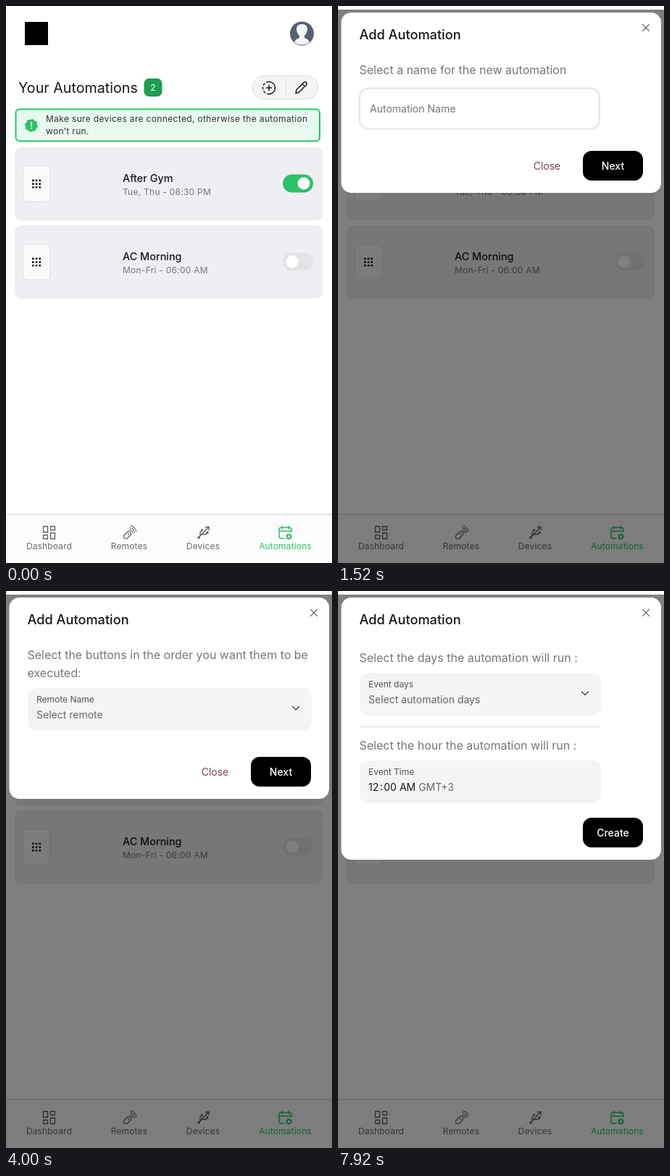
Animation of 450x769 px, one loop 8 s. Source, as an HTML page:

```html
<!DOCTYPE html>
<html lang="en">
<head>
<meta charset="utf-8">
<title>Add Automation</title>
<style>
html, body { margin: 0; height: 100%; overflow: hidden; background: #fff; }
svg { display: block; width: 450px; height: 769px; font-family: Inter, "Open Sans", sans-serif; }
</style>
</head>
<body>
<svg id="stage" viewBox="0 0 450 769"></svg>
<script>
const LOOP = 8000;
const GREEN = '#2cc168', DARK_GREEN = '#20a552', INK = '#18181b', GREY = '#76767c', FIELD = '#f4f4f5';
const stage = document.getElementById('stage');

// drawing helpers
const text = (x, y, s, size = 14, fill = INK, more = '') =>
  `<text x="${x}" y="${y}" font-size="${size}" fill="${fill}" ${more}>${s}</text>`;
const mid = (x, y, s, size, fill, more = '') => text(x, y, s, size, fill, 'text-anchor="middle" ' + more);
const rect = (x, y, w, h, r, fill, more = '') =>
  `<rect x="${x}" y="${y}" width="${w}" height="${h}" rx="${r}" fill="${fill}" ${more}/>`;
const circle = (x, y, r, fill, more = '') => `<circle cx="${x}" cy="${y}" r="${r}" fill="${fill}" ${more}/>`;
const line = (d, color, width = 1.3, more = '') =>
  `<path d="${d}" fill="none" stroke="${color}" stroke-width="${width}" stroke-linecap="round" stroke-linejoin="round" ${more}/>`;
const group = (id, body, more = '') => `<g id="${id}" ${more}>${body}</g>`;
const bold = 'font-weight="500"';
const lines = (x, y, step, rows, size, fill) => rows.map((s, i) => text(x, y + i * step, s, size, fill)).join('');

// page behind the dialog
function card(y, name, when, on) {
  let dots = '';
  for (let i = 0; i < 9; i++) dots += rect(36 + i % 3 * 4.7, y + 43.5 + Math.floor(i / 3) * 4.7, 2.7, 2.7, .7, INK);
  return rect(13, y, 423, 99, 8, '#efeff3', 'stroke="#e3e3e8"') +
    rect(23.5, y + 25, 37, 49, 6, '#fafafa', 'stroke="#e0e0e4"') + dots +
    text(161, y + 46.5, name, 14.4, INK, bold) +
    text(161, y + 64.5, when, 12, GREY, 'letter-spacing=".25"') +
    rect(382, y + 36.5, 42, 25, 12.5, on ? GREEN : '#e4e4e7') +
    circle(on ? 411 : 395, y + 49, 8.5, '#fff');
}

function nav() {
  const c = '#5c5c64', label = (x, s, fill = '#6b6b72') => mid(x, 750, s, 12, fill, 'letter-spacing=".15"');
  return rect(0, 702, 450, 67, 0, '#fcfcfc') + line('M0 702H450', '#dedee2', 1.5) +
    line('M51.5 718.5h6v8h-6zM61.5 718.5h6v5h-6zM51.5 730.5h6v5h-6zM61.5 727.5h6v8h-6z', c) +
    rect(-6, -3, 12, 6, 3, 'none', `stroke="${c}" stroke-width="1.2" transform="translate(167.5 730.5) rotate(-45)"`) +
    circle(169, 729, 1, c) +
    line('M171 723.5a4.5 4.5 0 0 1 4 4M171.5 720.5a7.5 7.5 0 0 1 6 6.5M172 717.500a10.5 10.5 0 0 1 8 8', c, 1.1) +
    line('M265.5 734.5L279 720M275.5 719.5l4.5-.5v4.5M268 731.5v-5l3-3M271 729.5h5l2.5-2.5', c) +
    circle(266, 734, 1.7, c) + circle(270.5, 723.5, 1.4, c) + rect(276.5, 725.5, 3, 3, .5, c) +
    line('M384 735h-4q-3 0-3-3v-9q0-3 3-3h11q3 0 3 3v3M377 725h17M381 718v4M390 718v4', GREEN, 1.5) +
    circle(390.5, 732.5, 2.6, 'none', `stroke="${GREEN}" stroke-width="1.8"`) +
    circle(390.5, 732.5, 4.2, 'none', `stroke="${GREEN}" stroke-dasharray="1.65"`) +
    label(59.5, 'Dashboard') + label(170, 'Remotes') + label(272, 'Devices') + label(385.5, 'Automations', GREEN);
}

const page =
  rect(0, 0, 450, 769, 0, '#fff') + rect(26, 22, 32, 32, 0, '#000') +
  circle(408.5, 38, 16.5, '#566074') +
  '<path d="M398 50q1-4 7-6v-3q-4-4-4-9 0-7 7.5-7t7.500 7q0 5-4 9v3q6 2 7 6-4 3.500-10.500 3.500T398 50z" fill="#f4f5f7"/>' +
  text(17, 119.5, 'Your Automations', 19.7) +
  rect(190.5, 100, 25, 25, 7, '#1d9f50') + mid(203, 117, '2', 12, '#fff') +
  rect(340, 96.5, 91, 32, 16, FIELD, 'stroke="#dcdce0"') + line('M386.5 97V128', '#e0e0e4', 1) +
  line('M363 104.5a8.500 8.500 0 0 1 0 17M363 109.500v7M359.500 113h7', INK, 1.5) +
  line('M363 121.5a8.500 8.500 0 0 1 0-17', INK, 1.5, 'stroke-dasharray="2.5 3.3"') +
  line('M400 120.5l1-5 10-10q2-1.500 3.500 0t0 3.500l-10 10zM409 107.500l3.500 3.500', INK, 1.5) +
  rect(13.5, 142.5, 419.5, 44, 5, '#e8f9ef', `stroke="${GREEN}" stroke-width="2"`) +
  circle(35, 165, 8.2, GREEN, `stroke="${GREEN}" stroke-width="1.5" stroke-dasharray="3.2"`) +
  line('M35 160.5v5', '#fff', 1.7) + circle(35, 169, 1, '#fff') +
  text(55, 160.3, 'Make sure devices are connected, otherwise the automation', 12, '#303036', 'letter-spacing=".34"') +
  text(55, 177.3, 'won’t run.', 12, '#303036', 'letter-spacing=".34"') +
  card(196, 'After Gym', 'Tue, Thu - 08:30 PM', true) +
  card(304, 'AC Morning', 'Mon-Fri - 06:00 AM', false) + nav();

// dialog steps
const chevron = (x, y, up) => line(`M${x - 4.5} ${y + (up ? 2.5 : -2.5)}l4.5 ${up ? -4.5 : 4.5} 4.5 ${up ? 4.5 : -4.5}`, '#3f3f46');
const field = (y, w, label, value) => rect(30, y, w, 59, 12, FIELD) +
  text(42, y + 20, label, 12, '#52525b') + text(42, y + 42, value, 14, '#66666d');
const prompt = (y, s) => text(29.5, y, s, 16, GREY);

function step(i, bottom, action, body) {
  return group('step' + i,
    rect(4.5, 9, 441.5, bottom - 9, 14, '#fff') + text(29.5, 46, 'Add Automation', 18.2, INK, bold) +
    line('M420.5 25.5l9 9M429.5 25.5l-9 9', '#6b6b72', 1.2) + body +
    (action === 'Next' ? mid(288.5, bottom - 32.5, 'Close', 14, '#7c4358') : '') +
    rect(338, bottom - 58, 83, 41, 12, '#000') + mid(379.5, bottom - 32.5, action, 14, '#fff', bold));
}

const intro = lines(29.5, 94, 25, ['Automations are a series of remote control',
    'commands, on potentially multiple devices, that can', 'run repeatedly or once at specific points of time.'], 16, '#34343a') +
  text(29.5, 182, 'To create an automation you will:', 16, '#34343a') +
  lines(54, 211, 24.9, ['Select the remote buttons in the series you wish', 'to be executed',
    'Select if you want the automation to run once or', 'repeatedly',
    'Select either the days of the week, or exact date', 'and time'], 16, '#34343a') +
  [0, 1, 2].map(i => circle(39.5, 206 + i * 49.8, 2.6, '#34343a')).join('');

const naming = prompt(94, 'Select a name for the new automation') +
  rect(30, 113.5, 331, 56, 12, '#fff', 'id="box" stroke-width="2"') +
  text(44, 147, 'Automation Name', 14, GREY, 'id="label"') + text(44, 155, '', 14, INK, 'id="typed"');

const choosing = prompt(94, 'Select the buttons in the order you want them to be') + prompt(119, 'executed:') +
  rect(30, 134, 392, 59, 12, FIELD) + text(42, 154, 'Remote Name', 12, '#52525b') +
  text(42, 176, '', 14, '#66666d', 'id="remote"') +
  group('down', chevron(400, 162, false)) + group('up', chevron(400, 162, true));

const chosen = text(34, 94, 'Selected buttons', 16.2, DARK_GREEN) +
  rect(30, 101, 391, 77, 12, '#fff', `stroke="${GREEN}" stroke-width="2"`) +
  rect(41, 111, 117, 57, 12, FIELD) + text(48, 131, 'AC Living Room', 12.2, GREY) +
  text(48, 153, '23 Med', 14.2, '#45454c', bold) +
  prompt(214, 'Select the remote:') + field(230, 396, 'Remote Name', 'Select remote') + chevron(400, 257, false);

const time = `<tspan fill="${INK}">12<tspan dx="1.5">:</tspan><tspan dx="1.5">00</tspan> AM</tspan> GMT+3`;
const schedule = prompt(98, 'Select the days the automation will run :') +
  field(113, 333, 'Event days', 'Select automation days') + chevron(341, 141.5, false) +
  line('M30 187.5H362', '#dcdce0', 1) + prompt(219, 'Select the hour the automation will run :') +
  field(234, 333, 'Event Time', time);

const menu = rect(29.5, 196, 391.5, 121, 14, '#fff', 'filter="url(#shadow)"') +
  lines(46, 227, 35.2, ['Velvet Sound', 'AC Living Room', 'RGB Living Room'], 14, '#34343a');

// phone keyboard
function keyboard() {
  const key = (x, y, w, fill) => rect(x, y + 1, w, 48, 5, '#3c3c3c') + rect(x, y, w, 48, 5, fill);
  const row = (s, x, y) => [...s].map((c, i) => key(x + i * 45, y, 38, '#898989') +
    mid(x + 19 + i * 45, y + 32, c, 26.5, '#fff', 'font-weight="300"')).join('');
  return rect(0, 485, 450, 284, 0, 'url(#board)') + rect(0, 485, 450, 55, 0, '#494949') +
    rect(0, 460, 450, 25, 0, '#f0f0f0') + rect(171.5, 471, 8, 6.5, 1, '#666') +
    line('M173.3 471v-2q0-2.2 2.2-2.2t2.2 2.2v2', '#666') +
    text(185.5, 477, 'air-remote.pro', 13.6, '#333') +
    line('M22 516l10-10 10 10M62 506l10 10 10-10', '#686868', 1.6) +
    text(98, 517, 'AutoFill Contact', 16.5, '#1684f8') + text(384, 517, 'Done', 18.6, '#1684f8', 'font-weight="600"') +
    line('M150 552v27M300 552v27', '#6f6f6f', 1) +
    group('hints', ['“automation”', 'automations', 'automation’s'].map((s, i) => mid(75 + i * 150, 572, s, 18, '#fff')).join('')) +
    row('qwertyuiop', 4, 597) + row('asdfghjkl', 26, 659) + row('zxcvbnm', 71, 721) +
    key(4, 721, 50, '#5d5d5d') + key(397, 721, 49, '#636363') +
    line('M28.5 736l11 11h-6v8h-10v-8h-6z', '#fff', 1.8) +
    line('M409 746l7-9h15q2 0 2 2v14q0 2-2 2h-15zM420 742l8 8M428 742l-8 8', '#fff', 1.8);
}

stage.innerHTML =
  '<filter id="shadow" x="-10%" y="-20%" width="120%" height="150%"><feDropShadow dx="0" dy="3" stdDeviation="5" flood-opacity=".15"/></filter>' +
  '<linearGradient id="board" x2="0" y2="1"><stop stop-color="#646464"/><stop offset="1" stop-color="#555"/></linearGradient>' +
  page + rect(0, 5, 450, 764, 0, '#000', 'id="shade"') +
  group('dialog', step(0, 429, 'Next', intro) + step(1, 258, 'Next', naming) + step(2, 287, 'Next', choosing) +
    step(3, 382, 'Next', chosen) + step(4, 371, 'Create', schedule)) +
  group('menu', menu) + group('keys', keyboard());

const $ = id => document.getElementById(id);
const set = (id, attrs) => Object.entries(attrs).forEach(([k, v]) => $(id).setAttribute(k, v));
const show = (id, on) => set(id, { visibility: on ? 'visible' : 'hidden' });
const ramp = (t, from, length) => Math.min(1, Math.max(0, (t - from) / length));
const easeOut = (p, n = 3) => 1 - (1 - p) ** n;

const OPEN = 240, STEPS = [OPEN, 1280, 3700, 6160, 7400];
const FOCUS = 1840, TYPE = 2240, KEY_TIME = 58, MENU = 4880, PICK = 5440;
const NAME = 'New automation';

function draw(t) {
  const fade = easeOut(ramp(t, OPEN, 258), 2);
  set('shade', { opacity: .5 * fade });
  set('dialog', { opacity: fade, transform: `translate(0 ${80 * (1 - easeOut(ramp(t, OPEN, 470)))})` });
  STEPS.forEach((start, i) => {
    set('step' + i, { display: t >= start && t < (STEPS[i + 1] ?? LOOP) ? 'inline' : 'none' });
  });

  const focus = t >= FOCUS, float = easeOut(ramp(t, FOCUS, 200));
  set('box', { stroke: focus ? GREEN : '#e4e4e7' });
  set('label', { y: 147 - 12 * float, 'font-size': 14 - 2 * float, fill: focus ? DARK_GREEN : GREY });
  const count = Math.floor(NAME.length * ramp(t, TYPE, KEY_TIME * NAME.length));
  $('typed').textContent = NAME.slice(0, count);
  show('hints', count > 7);

  const lift = easeOut(ramp(t, FOCUS + 40, 320)) - easeOut(ramp(t, STEPS[2], 320));
  set('keys', { transform: `translate(0 ${309 * (1 - lift)})` });

  const open = t >= MENU && t < PICK + 120, choosing = t >= STEPS[2] && t < STEPS[3];
  set('menu', { opacity: easeOut(ramp(t, MENU, 140)) * (1 - ramp(t, PICK, 120)) });
  set('up', { opacity: open ? 1 : 0 });
  set('down', { opacity: choosing && !open ? 1 : 0 });
  $('remote').textContent = t < PICK ? 'Select remote' : 'AC Living Room';
}

const begin = performance.now();
function frame() {
  draw((performance.now() - begin) % LOOP);
  requestAnimationFrame(frame);
}
frame();
</script>
</body>
</html>
```
